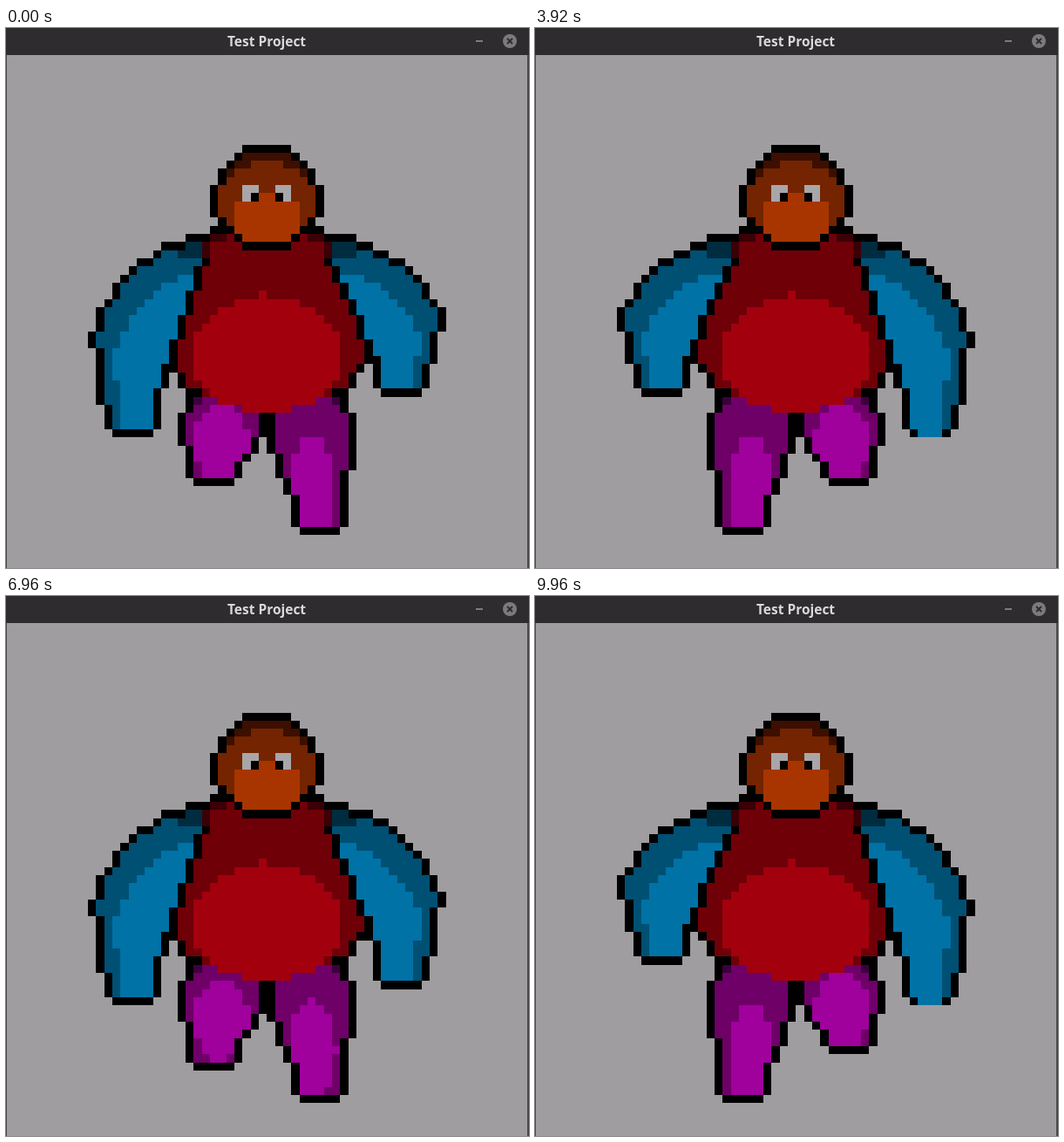
An HTML page with a canvas that plays this animation: 600x619 px, repeating every 10 s.

```html
<!DOCTYPE html>
<html lang="en">
<head>
<meta charset="utf-8">
<title>Test Project</title>
<style>
html, body { margin: 0; width: 100%; height: 100%; overflow: hidden; background: #9f9d9f; }
canvas { position: absolute; left: 0; top: 0; }
header {
  position: absolute; left: 0; top: 0; width: 598px; text-align: center;
  font: bold 15.5px/31px "Noto Sans", "Open Sans", sans-serif; color: #dad7da;
}
</style>
</head>
<body>
<canvas id="stage" width="600" height="619"></canvas>
<header>Test Project</header>
<script>
const ctx = document.getElementById('stage').getContext('2d');
const CELL = 9.33, LEFT = 94, TOP = 133.5, COLS = 44, ROWS = 48;
const LOOP = 10000, STEP = 40;

// the uneven pace of the walk: time in ms, phase in cycles (whole = right leg up)
const PACE = [[0, .475], [1400, 2.133], [3920, 4.975], [5560, 6.803],
              [6960, 8.637], [9120, 11.09], [9960, 11.975]];
const ARM_LEAD = .05;

// shapes are tests on cell coordinates
const ellipse = (cx, cy, rx, ry) => (x, y) => ((x - cx) / rx) ** 2 + ((y - cy) / ry) ** 2 < 1;
const union = (a, b) => (x, y) => a(x, y) || b(x, y);
const shift = (shape, dx, dy) => (x, y) => shape(x - dx, y - dy);
const mirror = shape => (x, y) => shape(COLS - x, y);
const same = shape => shape;
const polygon = points => (x, y) => {
  let hit = false;
  points.forEach(([ax, ay], i) => {
    const [bx, by] = points[(i + 1) % points.length];
    if (ay > y !== by > y && x < ax + (bx - ax) * (y - ay) / (by - ay)) hit = !hit;
  });
  return hit;
};

// shortens a limb: everything below the joint is scaled towards it
const shorten = (shape, joint, amount) => (x, y) =>
  shape(x, y > joint ? joint + (y - joint) / (1 - amount) : y);

function curve([ax, ay], [cx, cy], [bx, by], steps = 16) {
  return Array.from({ length: steps + 1 }, (_, i) => {
    const t = i / steps, s = 1 - t;
    return [s * s * ax + 2 * s * t * cx + t * t * bx, s * s * ay + 2 * s * t * cy + t * t * by];
  });
}

const ARM = polygon([...curve([13.5, 12], [3.4, 14.4], [.9, 24.8]),
  [2, 26], [2, 31], [3, 32], [3, 35], [8, 35], [8, 31], [14, 14], [14, 12]]);
const LEG = polygon([[14, 30], [20, 30], [21, 32], [21, 37], [20, 40], [18, 44.5], [18, 47],
  [13, 47], [13, 41], [12, 39.5], [12, 33.8], [13, 32]]);
const BODY = union(polygon([[15, 11], [29, 11], [32, 19], [12, 19]]), ellipse(22, 24.5, 12, 8.25));
const BELLY = ellipse(22, 25.8, 9.3, 7.1);
const HEAD = ellipse(22, 6.6, 5.9, 5.7);
const FACE = ellipse(22, 8.2, 6.3, 5.9);
const MUZZLE = polygon([[20.5, 5.9], [23.5, 5.9], [26, 7], [26, 12], [18, 12], [18, 7]]);

function rect(color, col, row, w = 1, h = 1) {
  const px = c => Math.round(LEFT + c * CELL), py = r => Math.round(TOP + r * CELL);
  ctx.fillStyle = color;
  ctx.fillRect(px(col), py(row), px(col + w) - px(col), py(row + h) - py(row));
}

function pair(color, col, row, w = 1, h = 1) {
  rect(color, col, row, w, h);
  rect(color, COLS - col - w, row, w, h);
}

// fills the cells of a shape; later bands win, and a one-cell black line surrounds it
function paint(shape, base, bands, outlined = true) {
  for (let row = 0; row < ROWS; row++) {
    for (let col = 0; col < COLS; col++) {
      const x = col + .5, y = row + .5;
      if (shape(x, y)) {
        let color = base;
        for (const [tone, area] of bands) if (area(x, y)) color = tone;
        rect(color, col, row);
      } else if (outlined && (shape(x - 1, y) || shape(x + 1, y) ||
                 shape(x, y - 1) || shape(x, y + 1))) {
        rect('#000', col, row);
      }
    }
  }
}

function leg(swing, side) {
  const raise = (1 + swing) / 2;
  const shape = shorten(LEG, 33, .43 * Math.max(0, swing));
  const light = ellipse(16.4, 42.5 - 5.8 * raise, 2.8 + .7 * raise, 6.5 - 1.8 * raise);
  paint(side(shape), '#6e0068',
    [['#3c003c', side(ellipse(13, 30, 2, 2))], ['#a0009c', side(light)]]);
}

function arm(swing, side) {
  const shape = shorten(ARM, 12, .22 * Math.max(0, swing));
  paint(side(shape), '#005074',
    [['#002c40', side(ellipse(13, 12, 4, 1.8))], ['#0072a6', side(shift(shape, 1.7, 3))]]);
}

function body(outlined) {
  paint(BODY, '#6f0008', [['#a3000d', BELLY]], outlined);
  rect('#a3000d', 21, 18);
}

function head() {
  paint(HEAD, '#3c0f00', [['#742400', FACE], ['#a83500', MUZZLE]]);
  pair('#a8a6a8', 19, 5, 2, 2);
  pair('#000', 20, 6);
}

function windowFrame() {
  const box = (color, ...area) => {
    ctx.fillStyle = color;
    ctx.fillRect(...area);
  };
  box('#9f9d9f', 0, 0, 600, 619);
  box('#2f2c30', 0, 0, 600, 31);
  box('#4a474a', 0, 31, 1, 588);
  box('#4a474a', 598, 31, 2, 588);
  box('#7d7a7d', 539, 14, 8, 2);
  ctx.beginPath();
  ctx.arc(578, 15, 8, 0, 7);
  ctx.fill();
  ctx.strokeStyle = '#2f2c30';
  ctx.lineWidth = 2;
  ctx.beginPath();
  for (const d of [-3, 3]) {
    ctx.moveTo(578 - d, 12);
    ctx.lineTo(578 + d, 18);
  }
  ctx.stroke();
}

function phaseAt(time) {
  const i = Math.max(1, PACE.findIndex(([at]) => at >= time));
  const [t0, p0] = PACE[i - 1], [t1, p1] = PACE[i];
  return p0 + (p1 - p0) * (time - t0) / (t1 - t0);
}

function draw(time) {
  const wave = phase => Math.cos(2 * Math.PI * phase);
  const phase = phaseAt(time), legs = wave(phase), arms = wave(phase + ARM_LEAD);
  windowFrame();
  body(true);
  leg(-legs, same);
  leg(legs, mirror);
  body(false);
  pair('#3a0006', 15, 11, 2);
  arm(arms, same);
  arm(-arms, mirror);
  pair('#3a0006', 14, 12, 1, 2);
  if (arms > 0) rect('#0072a6', 37, 35, 3);
  head();
}

let shown = -1;
function tick(now) {
  const time = Math.floor(now % LOOP / STEP) * STEP;
  if (time !== shown) draw(shown = time);
  requestAnimationFrame(tick);
}
tick(performance.now());
</script>
</body>
</html>
```
